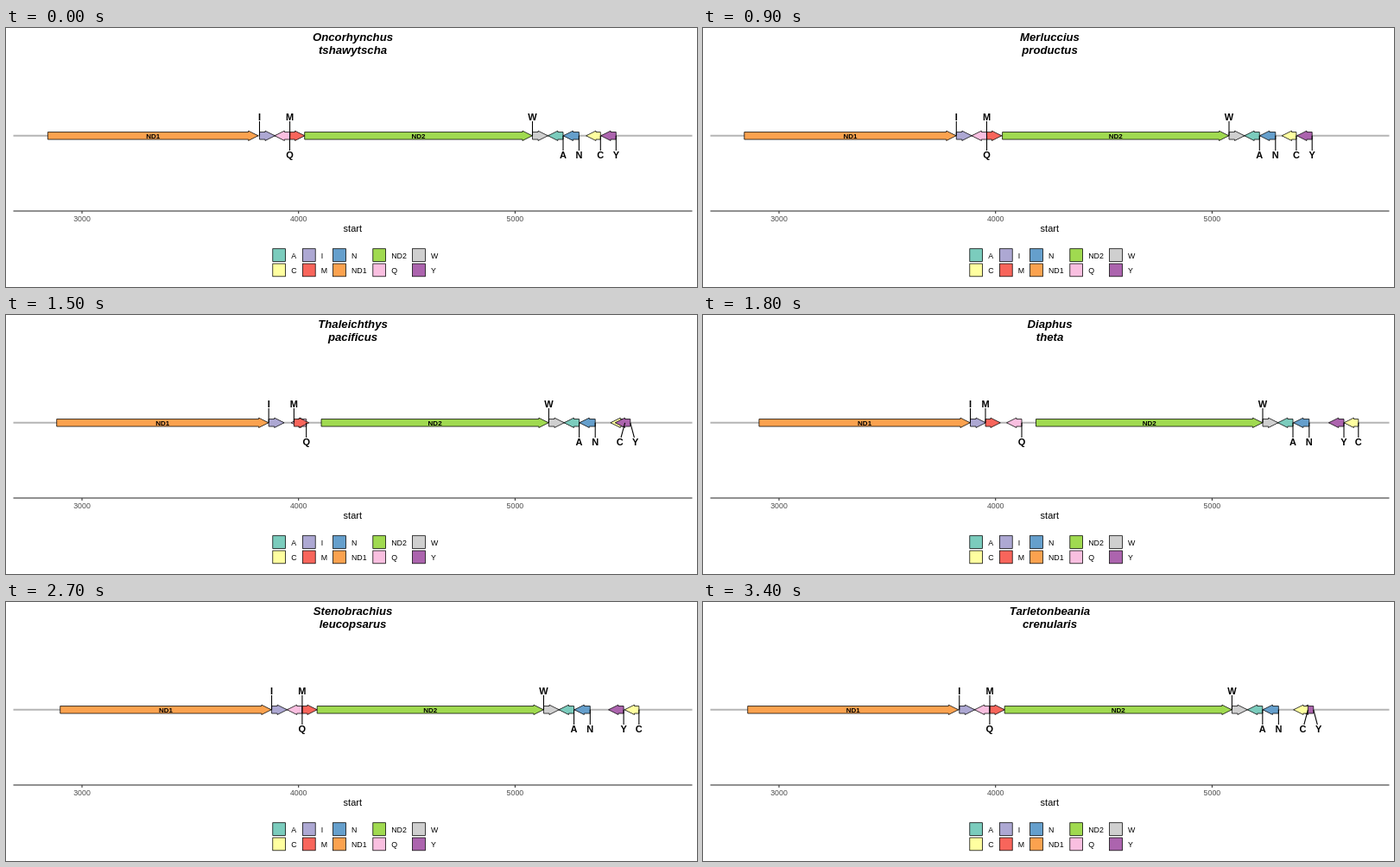
Recreate the animation shown at these times as an HTML page. Size 800 by 300 pixels, loop 3.5 s.

```html
<!DOCTYPE html>
<html lang="en">
<head>
<meta charset="utf-8">
<title>Gene order</title>
<style>
  html, body { margin: 0; width: 100%; height: 100%; overflow: hidden; background: #fff; }
  svg { display: block; width: 800px; height: 300px; font-family: "Liberation Sans", Arial, Helvetica, sans-serif; }
  .title { font: italic bold 13.2px "Liberation Sans", Arial, sans-serif; text-anchor: middle; }
  .tag { font-size: 11px; font-weight: bold; text-anchor: middle; }
  .inner { font-size: 8px; font-weight: bold; text-anchor: middle; }
  .tick { font-size: 8.8px; fill: #4d4d4d; text-anchor: middle; }
  .axis { font-size: 11px; text-anchor: middle; }
  .key { font-size: 8.8px; }
  .gene, .swatch { stroke: #000; stroke-width: .75; }
  .lead { stroke: #000; stroke-width: 1.07; }
</style>
</head>
<body>
<svg id="stage" viewBox="0 0 800 300"></svg>
<script>
const stage = document.getElementById('stage');
const MID = 124.8, STEP = 100, HOLD = 3, MOVE = 3;
const HEAD = 11.34, HEAD_H = 5.67, BODY_H = 4.25;

// dir: 1 points right, -1 points left; len is omitted where the end varies
const genes = [
  { id: 'ND1', dir: 1, fill: '#fba24f' },
  { id: 'I', dir: 1, len: 17.9, fill: '#ada8d3' },
  { id: 'Q', dir: -1, len: 17.5, fill: '#f9bfe0' },
  { id: 'M', dir: 1, len: 17.3, fill: '#f8655b' },
  { id: 'ND2', dir: 1, fill: '#a0da50' },
  { id: 'W', dir: 1, len: 17.9, fill: '#cfcfcf' },
  { id: 'A', dir: -1, len: 17.5, fill: '#7bccbd' },
  { id: 'N', dir: -1, len: 18.3, fill: '#659fcc' },
  { id: 'C', dir: -1, len: 16.7, fill: '#ffffa0' },
  { id: 'Y', dir: -1, len: 17.6, fill: '#ac64ae' }
];

// tails: flat end of each gene, in the order above; nd1End: tip of ND1
const states = [
  { name: 'Oncorhynchus tshawytscha', nd1End: 292,
    tails: [48.4, 293.5, 328.5, 328.6, 345.7, 609.5, 645, 663.4, 688.3, 706.3] },
  { name: 'Merluccius productus', nd1End: 289,
    tails: [43.9, 289.2, 324.3, 324.4, 342.5, 604.2, 639.5, 658, 682.6, 701.2] },
  { name: 'Thaleichthys pacificus', nd1End: 301.3,
    tails: [55.6, 301.5, 337, 336.6, 354.8, 618.6, 653.9, 672.4, 695.5, 713.2] },
  { name: 'Diaphus theta', nd1End: 309.3,
    tails: [64.9, 309.5, 369, 327, 385.5, 648, 683, 701.8, 758.8, 742] },
  { name: 'Stenobrachius leucopsarus', nd1End: 309.3,
    tails: [64.9, 309.7, 345, 345, 362.3, 624.6, 659.6, 678.3, 737, 718.8] },
  { name: 'Tarletonbeania crenularis', nd1End: 303,
    tails: [58.4, 303.3, 338.7, 338.8, 356, 618.2, 653.5, 672.3, 724.5, 707.7] }
];

function add(tag, attrs, text, parent = stage) {
  const el = document.createElementNS('http://www.w3.org/2000/svg', tag);
  set(el, attrs);
  if (text !== undefined) el.textContent = text;
  return parent.appendChild(el);
}

function set(el, attrs) {
  for (const key in attrs) el.setAttribute(key, attrs[key]);
}

const lerp = (a, b, p) => a + (b - a) * p;
const indexOf = id => genes.findIndex(g => g.id === id);
const [W, C, Y] = ['W', 'C', 'Y'].map(indexOf);

function arrowPath(tail, tip, dir) {
  const neck = tip - dir * Math.min(HEAD, Math.abs(tip - tail));
  return `M${tail} ${MID - BODY_H}H${neck}V${MID - HEAD_H}L${tip} ${MID}` +
    `L${neck} ${MID + HEAD_H}V${MID + BODY_H}H${tail}Z`;
}

// Fixed parts
add('path', { d: `M8.5 ${MID}H794.5`, stroke: '#b4b4b4', 'stroke-width': 2.13 });
add('path', { d: 'M8.5 212H794.5', stroke: '#222', 'stroke-width': 1.1 });
[3000, 4000, 5000].forEach((value, i) => {
  const x = 88 + i * 250.7;
  add('path', { d: `M${x} 212v3`, stroke: '#333', 'stroke-width': 1.07 });
  add('text', { class: 'tick', x, y: 224 }, value);
});
add('text', { class: 'axis', x: 401.3, y: 236 }, 'start');

const keyColumns = [308.8, 343.4, 378.6, 424.8, 470.6];
[...genes].sort((a, b) => a.id < b.id ? -1 : 1).forEach((g, i) => {
  const x = keyColumns[i >> 1], y = 255.7 + (i % 2) * 17.3;
  add('rect', { class: 'swatch', x, y, width: 14.8, height: 14.8, fill: g.fill });
  add('text', { class: 'key', x: x + 21.4, y: y + 11.2 }, g.id);
});

// Moving parts
const titles = [15, 30].map(y => add('text', { class: 'title', x: 401.5, y }));
const geneLayer = add('g', {}), tagLayer = add('g', {});
for (const g of genes) {
  g.shape = add('path', { class: 'gene', fill: g.fill }, undefined, geneLayer);
  if (g.len) {
    g.lead = add('line', { class: 'lead', y1: MID, y2: g.dir > 0 ? 108 : 142 }, undefined, tagLayer);
    g.tag = add('text', { class: 'tag', y: g.dir > 0 ? 107 : 151 }, g.id, tagLayer);
  } else {
    g.tag = add('text', { class: 'inner', y: 127.7 }, g.id, tagLayer);
  }
}

// Keeps the C and Y tags from overlapping
function spreadTags(tails) {
  const tags = [...tails], gap = tails[Y] - tails[C];
  if (Math.abs(gap) < 16) {
    const mid = (tails[C] + tails[Y]) / 2, half = gap < 0 ? -9 : 9;
    tags[C] = mid - half;
    tags[Y] = mid + half;
  }
  return tags;
}

function draw(from, to, p) {
  const tails = from.tails.map((x, i) => lerp(x, to.tails[i], p));
  const tags = spreadTags(tails);
  const nd1End = lerp(from.nd1End, to.nd1End, p);

  genes.forEach((g, i) => {
    const tail = tails[i];
    const tip = g.len ? tail + g.dir * g.len : g.id === 'ND1' ? nd1End : tails[W] - .2;
    g.shape.setAttribute('d', arrowPath(tail, tip, g.dir));
    if (g.lead) {
      set(g.lead, { x1: tail, x2: lerp(tail, tags[i], .78) });
      g.tag.setAttribute('x', tags[i]);
    } else {
      g.tag.setAttribute('x', (tail + tip) / 2);
    }
  });

  // Stacking follows the order in the state being left
  genes.map((g, i) => ({ g, left: from.tails[i] - (g.dir < 0 ? g.len : 0) }))
    .sort((a, b) => a.left - b.left)
    .forEach(({ g }) => geneLayer.appendChild(g.shape));

  (p < 1 ? from : to).name.split(' ').forEach((word, i) => { titles[i].textContent = word; });
}

const cycle = HOLD + MOVE, total = states.length * cycle - 1;
let shown = -1;

function update(ms) {
  const step = Math.floor(ms / STEP) % total;
  if (step === shown) return;
  shown = step;
  const i = Math.floor(step / cycle);
  const p = Math.max(0, step % cycle - HOLD + 1) / MOVE;
  draw(states[i], states[(i + 1) % states.length], p);
}

const begin = performance.now();
function tick() {
  update(performance.now() - begin);
  requestAnimationFrame(tick);
}
tick();
</script>
</body>
</html>
```
